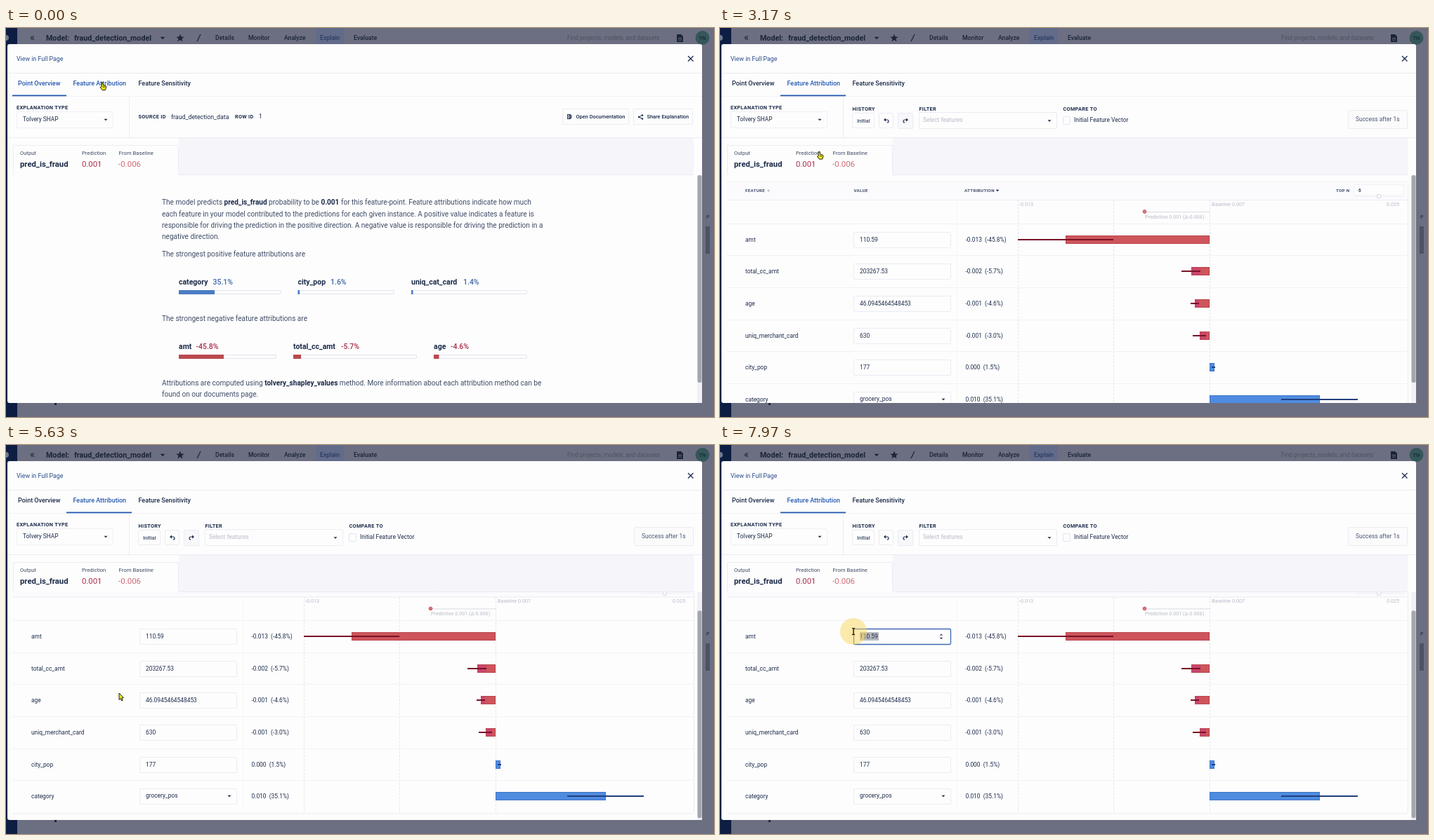
Write an HTML page with a canvas that moves like this. It is 1008 px wide and 555 px high and loops after 8000 ms.

```html
<!DOCTYPE html>
<html lang="en">
<head>
<meta charset="utf-8">
<title>Model explanation</title>
<style>
html, body { margin: 0; width: 100%; height: 100%; overflow: hidden; background: #6c6f81; }
canvas { display: block; }
</style>
</head>
<body>
<canvas id="stage" width="1008" height="555"></canvas>
<script>
const ctx = document.getElementById('stage').getContext('2d');
const LOOP = 8000, SWITCH = 430, MAX_SCROLL = 28.6, PRESS = 7470;
const INK = '#1c2b4a', BODY = '#3f4c66', BLUE = '#2458b0', FAINT = '#b8bbca', LINE = '#ebecf4';
const DIM = '#6c6f81', PAPER = '#fdfdfd';
const RED = '#cd555b', CRIMSON = '#a92f4b', SKY = '#4f8ce0';

// time, x, y of the pointer tip
const PATH = [
  [0, 137, 78], [2000, 137, 78], [2950, 141, 176.5], [3650, 142, 177], [4000, 151, 177.5],
  [4400, 151, 177.5], [4780, 161, 354], [6000, 161, 354], [6480, 234, 269],
  [7400, 234, 269], [7520, 234, 269], [7900, 190, 266], [8000, 190, 266]
];
const ROWS = [
  ['amt', '110.59', '-0.013  (-45.8%)', 492, 697, 424, 560],
  ['total_cc_amt', '203267.53', '-0.002  (-5.7%)', 671, 697, 657, 684],
  ['age', '46.0945464548453', '-0.001  (-4.6%)', 676, 697, 670, 682],
  ['uniq_merchant_card', '630', '-0.001  (-3.0%)', 683, 697, 673, 692],
  ['city_pop', '177', '0.000  (1.5%)', 697, 704, 700, 705],
  ['category', 'grocery_pos', '0.010  (35.1%)', 697, 854, 799, 908]
];

const clamp = (v, lo, hi) => Math.min(hi, Math.max(lo, v));
const ease = p => p * p * (3 - 2 * p);
const progress = (t, from, to) => ease(clamp((t - from) / (to - from), 0, 1));

function pointerAt(t) {
  const i = clamp(PATH.findIndex(k => k[0] > t), 1, PATH.length - 1);
  const [t0, x0, y0] = PATH[i - 1], [t1, x1, y1] = PATH[i];
  const p = progress(t, t0, t1);
  return { x: x0 + (x1 - x0) * p, y: y0 + (y1 - y0) * p };
}

function text(str, x, y, size, color = INK, weight = 400, spacing = 0) {
  ctx.font = `${weight} ${size}px Roboto, sans-serif`;
  ctx.letterSpacing = spacing + 'px';
  ctx.fillStyle = color;
  ctx.fillText(str, x, y + size * 0.35);
  return x + ctx.measureText(str).width;
}
const caption = (str, x, y) => text(str, x, y, 7.3, INK, 700, 0.3);
const heading = (str, x, y) => text(str, x, y, 6.2, BODY, 700, 0.3);

// Segments between asterisks are bold.
function rich(str, x, y) {
  str.split('*').forEach((part, i) => {
    x = text(part, x, y, 10.07, i % 2 ? INK : BODY, i % 2 ? 700 : 400);
  });
}

function fill(x, y, w, h, color) {
  ctx.fillStyle = color;
  ctx.fillRect(x, y, w, h);
}

function box(x0, y0, x1, y1, stroke = LINE, width = 1, color = PAPER) {
  ctx.beginPath();
  ctx.roundRect(x0 + 0.5, y0 + 0.5, x1 - x0 - 1, y1 - y0 - 1, 1.5);
  ctx.fillStyle = color;
  ctx.fill();
  ctx.strokeStyle = stroke;
  ctx.lineWidth = width;
  ctx.stroke();
}

function stroke(points, color, width = 1, dash = []) {
  ctx.beginPath();
  points.forEach(([x, y]) => ctx.lineTo(x, y));
  ctx.strokeStyle = color;
  ctx.lineWidth = width;
  ctx.setLineDash(dash);
  ctx.stroke();
  ctx.setLineDash([]);
}

function polygon(points, color, outline) {
  ctx.beginPath();
  points.forEach(([x, y]) => ctx.lineTo(x, y));
  ctx.closePath();
  ctx.fillStyle = color;
  ctx.fill();
  if (outline) { ctx.strokeStyle = outline; ctx.lineWidth = 1; ctx.stroke(); }
}

function disc(x, y, r, color, outline) {
  ctx.beginPath();
  ctx.arc(x, y, r, 0, Math.PI * 2);
  ctx.fillStyle = color;
  ctx.fill();
  if (outline) { ctx.strokeStyle = outline; ctx.lineWidth = 1; ctx.stroke(); }
}

const caret = (x, y, s = 2.5, dir = 1, color = INK) =>
  polygon([[x - s, y - dir * s / 2], [x + s, y - dir * s / 2], [x, y + dir * s / 2]], color);

function drawBackdrop() {
  const dark = '#1b2438';
  fill(0, 0, 1008, 555, DIM);
  fill(0, 0, 16, 555, '#0d1e42');
  fill(441, 0, 40, 23, '#626b8a');
  disc(0, 14, 4, '#6f7890');
  text('«', 34, 13, 15, dark);
  text('Model:', 57, 14, 10.7, dark, 700);
  text('fraud_detection_model', 97, 14, 10.7, dark, 700);
  caret(223, 14.5, 3.3, 1, dark);
  const star = Array.from({ length: 10 }, (_, i) => {
    const a = i * Math.PI / 5 - Math.PI / 2, r = i % 2 ? 2.5 : 6;
    return [248 + r * Math.cos(a), 14.5 + r * Math.sin(a)];
  });
  polygon(star, dark);
  stroke([[272, 19], [277, 9]], dark, 1.2);
  [['Details', 298], ['Monitor', 345], ['Analyze', 396], ['Explain', 447], ['Evaluate', 495]]
    .forEach(([s, x]) => text(s, x, 14, 8.7, s === 'Explain' ? '#2b3c62' : dark, 500));
  text('Find projects, models, and datasets', 799, 14, 8.4, '#4c515f');
  polygon([[955, 9], [961, 9], [964, 12], [964, 20], [955, 20]], dark);
  stroke([[957, 14.5], [962, 14.5]], DIM);
  stroke([[957, 17], [962, 17]], DIM);
  disc(991.5, 14, 10, '#35565a');
  text('TN', 986.5, 14, 7.5, '#132c38', 500);
  text('P', 997, 270, 7, dark);
  fill(996, 283, 6, 39, '#4e5263');
  fill(69, 535, 3, 3, dark);
}

function drawHeader(t) {
  const swapped = t >= SWITCH, slide = progress(t, SWITCH, SWITCH + 250);
  ctx.beginPath();
  ctx.roundRect(2, 23, 989, 512, 3);
  ctx.fillStyle = PAPER;
  ctx.fill();
  text('View in Full Page', 15, 43.5, 8.8, '#2b4a8c');
  stroke([[971, 40], [978.5, 47.5]], INK, 1.3);
  stroke([[978.5, 40], [971, 47.5]], INK, 1.3);
  stroke([[2, 64.5], [991, 64.5]], LINE);
  stroke([[2, 97.5], [991, 97.5]], '#f3f3f8');
  text('Point Overview', 17, 79, 9, swapped ? INK : BLUE, 500);
  text('Feature Attribution', 95.5, 79, 9, BLUE, 500);
  text('Feature Sensitivity', 188.5, 79, 9, INK, 500);
  fill(9 + 77 * slide, 95.5, 77 + 16 * slide, 1.8, BLUE);

  caption('EXPLANATION TYPE', 15, 113);
  box(15, 119, 153, 143, '#efeff6');
  text('Tolvery SHAP', 24, 130, 8.4);
  caret(142, 131);
  stroke([[175.5, 98], [175.5, 156]], LINE);
  stroke([[2, 156.5], [991, 156.5]], LINE);
  swapped ? drawAttributionTools() : drawOverviewTools();

  fill(246, 157, 733, 53, '#f5f5fa');
  box(10, 167, 246, 211);
  fill(10.5, 208, 235, 4, PAPER);
  stroke([[246, 209.5], [979, 209.5]], LINE);
  text('Output', 20, 178.5, 7.6, BODY);
  text('Prediction', 108, 178.5, 7.6, BODY);
  text('From Baseline', 160.5, 178.5, 7.8, BODY);
  text('pred_is_fraud', 20, 194, 11.3, INK, 700);
  text('0.001', 108, 194, 11.3, CRIMSON);
  text('-0.006', 160, 194, 11.5, '#cf6b74');
}

function drawOverviewTools() {
  caption('SOURCE ID', 188.5, 126.5);
  text('fraud_detection_data', 235, 126.5, 8.8);
  caption('ROW ID', 326, 126.5);
  text('1', 360, 126.5, 8.4);
  box(792, 115, 887, 138);
  ctx.strokeStyle = INK;
  ctx.strokeRect(799.5, 123.5, 4, 6);
  ctx.strokeRect(801.5, 125, 3.5, 3);
  text('Open Documentation', 811.5, 126.5, 7.4, INK, 500);
  box(893, 115, 978, 138);
  const nodes = [[906, 124.5], [901, 127], [906, 129.5]];
  stroke(nodes, INK);
  nodes.forEach(([x, y]) => disc(x, y, 1.2, INK));
  text('Share Explanation', 912.5, 126.5, 7.4, INK, 500);
}

function drawTurn(x, dir) {
  ctx.save();
  ctx.translate(x, 0);
  ctx.scale(dir, 1);
  ctx.beginPath();
  ctx.moveTo(-3, 131);
  ctx.lineTo(1, 131);
  ctx.arc(1, 133, 2, -Math.PI / 2, Math.PI / 2);
  ctx.strokeStyle = INK;
  ctx.lineWidth = 1.1;
  ctx.stroke();
  polygon([[-4, 131], [-1, 128.5], [-1, 133.5]], INK);
  ctx.restore();
}

function drawAttributionTools() {
  caption('HISTORY', 188.5, 115);
  caption('FILTER', 283.5, 115);
  caption('COMPARE TO', 488.5, 115);
  box(188, 121, 220, 143);
  text('Initial', 195, 132, 7.4, BODY, 500);
  box(226, 121, 247, 143);
  drawTurn(237, 1);
  box(253, 121, 275, 144, LINE, 1, '#f8f8fb');
  drawTurn(264, -1);
  box(283, 120, 480, 144);
  text('Select features', 289, 131.5, 8.5, FAINT);
  caret(469, 132.5);
  box(488, 126, 499, 138, '#e3e5f0');
  text('Initial Feature Vector', 504, 131.5, 8.45);
  box(894, 117, 979, 144, LINE, 1, '#fbfbfc');
  text('Success after 1s', 905, 130, 8.45, '#4b5874');
}

function meter(name, value, x, y, end, level, color, tone, valueX) {
  text(name, x, y, 10.5, INK, 700);
  text(value, valueX, y, 10.5, tone, 500);
  const top = Math.round(y + 11.5);
  box(x, top, end, top + 6, '#e2e4ef');
  fill(x, top, level - x, 6, color);
}

function drawOverview() {
  rich('The model predicts *pred_is_fraud* probability to be *0.001* for this feature-point. Feature attributions indicate how much', 222, 248.5);
  rich('each feature in your model contributed to the predictions for each given instance. A positive value indicates a feature is', 222, 265);
  rich('responsible for driving the prediction in the positive direction. A negative value is responsible for driving the prediction in a', 222, 281);
  rich('negative direction.', 222, 297.5);
  rich('The strongest positive feature attributions are', 222, 322.5);
  const up = ['#4a7cc4', '#3f68a8'], down = ['#b9494f', CRIMSON];
  meter('category', '35.1%', 246, 362.5, 392, 297, ...up, 294.5);
  meter('city_pop', '1.6%', 415.5, 362.5, 553, 418, ...up, 462);
  meter('uniq_cat_card', '1.4%', 577, 362.5, 742, 579.5, ...up, 651);
  rich('The strongest negative feature attributions are', 222, 414);
  meter('amt', '-45.8%', 246, 454, 385, 310, ...down, 270.5);
  meter('total_cc_amt', '-5.7%', 409, 454, 585, 420, ...down, 477);
  meter('age', '-4.6%', 609, 454, 742, 616.5, ...down, 633);
  rich('Attributions are computed using *tolvery_shapley_values* method. More information about each attribution method can be', 222, 506);
  rich('found on our documents page.', 222, 522.5);
}

function drawBar([, , , x0, x1, w0, w1], y) {
  const negative = x1 === 697;
  fill(x0, y - 6, x1 - x0, 12, negative ? RED : SKY);
  if (negative && x0 > 600) fill(x0, y - 6, w1 - x0, 12, '#c9466f');
  ctx.strokeStyle = negative ? '#b9454f' : '#3e74c4';
  ctx.lineWidth = 1;
  ctx.strokeRect(x0 + 0.5, y - 5.5, x1 - x0 - 1, 11);
  fill(w0, y - 1, w1 - w0, 2, negative ? '#7b1226' : '#213f7d');
}

function drawTable(t, pointer, scroll) {
  const rowY = i => Math.round(301.5 + i * 45.7 - scroll) + scroll;
  fill(9, 219, 970, 26, '#fbfbfd');
  stroke([[9, 219.5], [979, 219.5]], '#f2f2f7');
  stroke([[9, 245.5], [979, 245.5]], LINE);
  heading('FEATURE', 36, 232);
  caret(69, 230.7, 2, -1, FAINT);
  caret(69, 233.3, 2, 1, FAINT);
  heading('VALUE', 190.5, 232);
  heading('ATTRIBUTION', 348, 232);
  caret(395, 232, 2.5);
  heading('TOP N', 877, 232);
  box(902, 223, 974, 239, '#f1f1f7');
  text('6', 909, 232, 6.5, INK, 500);
  stroke([[905, 240.5], [974, 240.5]], '#eeeff5');
  disc(938, 240.2, 2.8, '#fff', '#d2d4de');

  stroke([[979.5, 219], [979.5, 553]], LINE);
  stroke([[337.5, 246], [337.5, 553]], '#f7f7fa');
  [424.5, 560.5, 697.5].forEach(x => stroke([[x, 246], [x, 553]], '#e3e5ef', 1, [3, 2]));
  text('-0.013', 426, 251.5, 7.2, FAINT);
  text('Baseline 0.007', 700, 251.5, 7.2, FAINT);
  text('0.025', 949, 251.5, 7.2, FAINT);
  stroke([[607, 262.5], [697, 262.5]], '#d8dae5');
  disc(604.5, 262, 2.4, '#de7178', '#c75c68');
  text('Prediction 0.001 (Δ-0.006)', 605, 269.5, 7.2, FAINT);

  ROWS.forEach((row, i) => {
    const y = rowY(i), focused = i === 0 && t >= PRESS;
    stroke([[9, y - 22.5], [979, y - 22.5]], '#f2f2f7');
    text(row[0], 36, y, 8.4);
    box(190, y - 11, 329, y + 12, focused ? '#3f68b4' : LINE, focused ? 1.3 : 1);
    if (focused) {
      const left = clamp(pointer.x, 199, 226);
      fill(left, y - 6, 226 - left, 12, '#b9babf');
    }
    text(row[1], 199, i === 5 ? y - 0.5 : y, 8.4);
    if (i === 5) caret(318, y);
    if (i === 0 && t > 6380) {
      caret(315, y - 2.5, 2.2, -1);
      caret(315, y + 2.8, 2.2, 1);
    }
    text(row[2], 349.5, y, 8.4);
    drawBar(row, y);
  });
  stroke([[560.5, rowY(0) - 6], [560.5, rowY(0) + 6]], '#b75a68');
  stroke([[9, 554.5], [979, 554.5]], LINE);
}

function drawContent(t, pointer) {
  const scroll = MAX_SCROLL * (1 - (1 - clamp((t - 4700) / 480, 0, 1)) ** 3.5);
  ctx.save();
  ctx.beginPath();
  ctx.rect(2, 210, 989, 325);
  ctx.clip();
  if (t < SWITCH) {
    drawOverview();
  } else {
    ctx.translate(0, -scroll);
    drawTable(t, pointer, scroll);
    ctx.translate(0, scroll);
  }
  fill(984, 210, 7, 325, '#f1f1f5');
  ctx.beginPath();
  ctx.roundRect(984.5, 210 + scroll * 0.92, 6, 296, 2.5);
  ctx.fillStyle = '#a5a6ab';
  ctx.fill();
  ctx.restore();
}

function drawPointer(t, { x, y }) {
  const pressed = t >= PRESS || (t > 270 && t < 480);
  if (pressed) disc(x, y, 19, 'rgba(250, 216, 90, 0.5)');
  ctx.save();
  ctx.translate(x, y);
  if (t < 4450) {
    polygon([[-1, 0], [1, 0], [1.3, 3.5], [5, 4.5], [5.8, 6], [4.5, 10.5], [0, 10.5], [-2.8, 6.5], [-1, 6]], '#f2e91c', '#25240c');
    stroke([[1.5, 5], [1.5, 7]], '#25240c', 0.8);
    stroke([[3.3, 5], [3.3, 7]], '#25240c', 0.8);
  } else if (t < 6380) {
    polygon([[0, 0], [0, 9.5], [2.2, 7.6], [3.8, 11], [5.3, 10.2], [3.8, 7], [6.3, 6.5]], '#e6e31c', '#25240c');
  } else {
    stroke([[0, -4], [0, 4]], '#2b2910', 1.8);
    [-4.5, 4.5].forEach(e => stroke([[-2.2, e], [2.2, e]], '#2b2910', 1.1));
    stroke([[0, -3], [0, 3]], '#c9bd28', 0.6);
  }
  ctx.restore();
}

function frame() {
  const t = performance.now() % LOOP, pointer = pointerAt(t);
  drawBackdrop();
  drawHeader(t);
  drawContent(t, pointer);
  drawPointer(t, pointer);
  requestAnimationFrame(frame);
}
frame();
</script>
</body>
</html>
```
